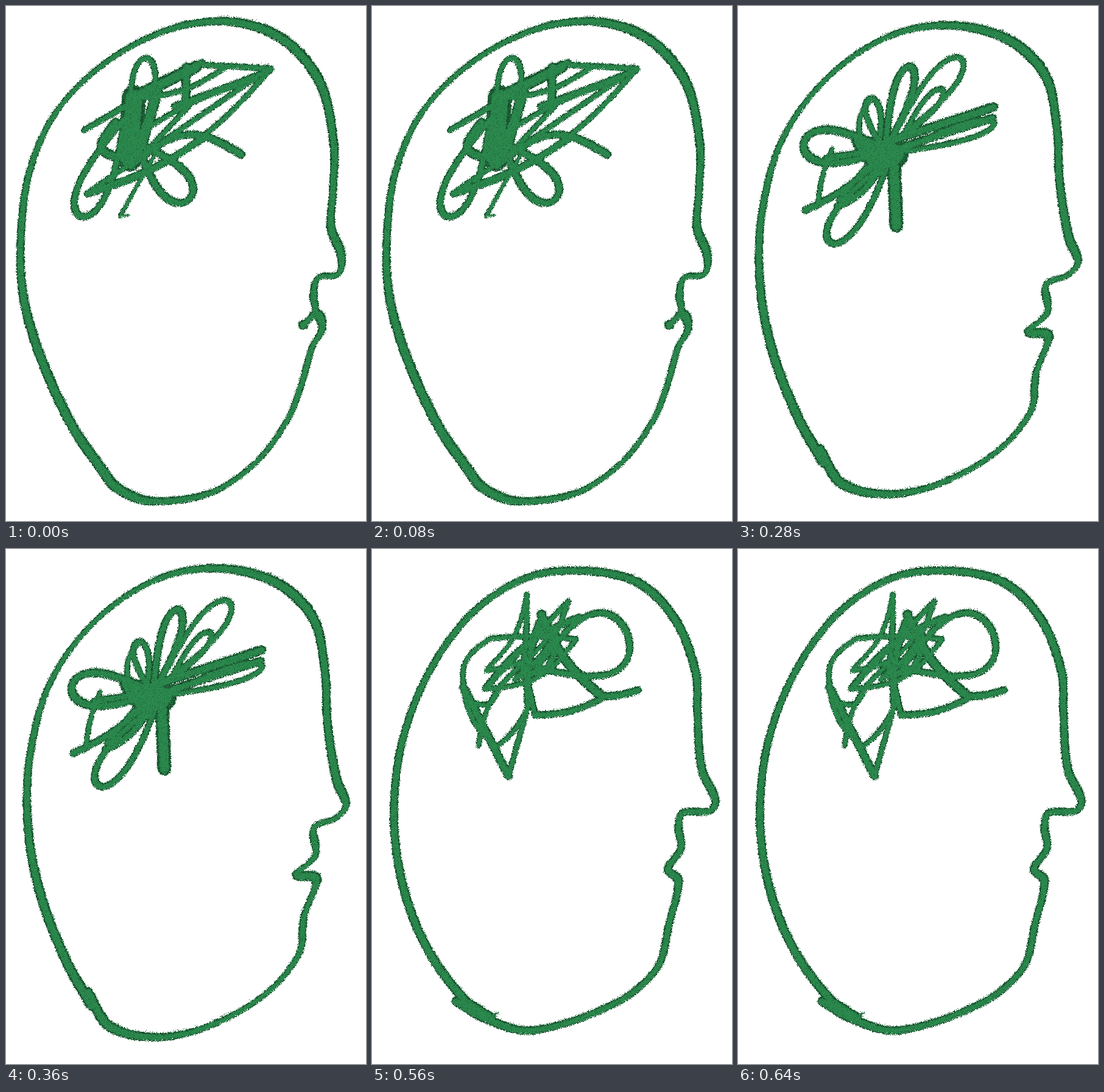
Animation of 591x846 px, one loop 700 ms. Source, as an HTML page with a canvas:

```html
<!DOCTYPE html>
<html lang="en">
<head>
<meta charset="utf-8">
<title>Scribbled thoughts</title>
<style>
  html, body { margin: 0; width: 100%; height: 100%; overflow: hidden; background: #fff; }
  canvas { position: absolute; left: 0; top: 0; animation: show 700ms step-end infinite; }
  @keyframes show {
    0% { opacity: 1; }
    20%, 100% { opacity: 0; }
  }
</style>
</head>
<body>
<script>
const W = 591, H = 846, HOLD = 140, LOOP = 700;
const PEN = 10, KNOT_NIB = 0.1;

// Each stroke is a function of t in 0..1 with a width and a nib contrast.
let strokes = [];

// Runs from a to b: "along" leads there, "across" swings to the right of travel.
function swing(ax, ay, bx, by, along, across, width) {
  const dx = bx - ax, dy = by - ay, len = Math.hypot(dx, dy);
  const at = t => [
    ax + dx * along(t) - dy / len * across(t),
    ay + dy * along(t) + dx / len * across(t)
  ];
  strokes.push({ at, width, nib: KNOT_NIB, steps: Math.ceil(len * 2.5) });
}

// A bowed line.
const arc = (ax, ay, bx, by, bow = 0, width = PEN) =>
  swing(ax, ay, bx, by, t => t, t => bow * Math.sin(Math.PI * t), width);

// A loop from a root, round the tip and back.
const petal = (ax, ay, bx, by, fat, width = PEN) =>
  swing(ax, ay, bx, by, t => Math.sin(Math.PI * t), t => fat * Math.sin(2 * Math.PI * t), width);

// A smooth closed-looking contour through key points, spaced by chord length.
function contour(text, nib) {
  const p = text.split(' ').map(s => s.split(',').map(Number));
  const n = p.length - 1, pos = [0];
  for (let i = 1; i <= n; i++) {
    pos.push(pos[i - 1] + Math.hypot(p[i][0] - p[i - 1][0], p[i][1] - p[i - 1][1]));
  }
  const slope = (i, k) => {
    const a = Math.max(0, i - 1), b = Math.min(n, i + 1);
    return (p[b][k] - p[a][k]) / (pos[b] - pos[a]);
  };
  const at = t => {
    const d = t * pos[n];
    let i = 0;
    while (i < n - 1 && pos[i + 1] < d) i++;
    const h = pos[i + 1] - pos[i], u = (d - pos[i]) / h, v = 1 - u;
    return [0, 1].map(k =>
      v * v * (1 + 2 * u) * p[i][k] + u * u * (1 + 2 * v) * p[i + 1][k] +
      u * v * h * (v * slope(i, k) - u * slope(i + 1, k)));
  };
  strokes.push({ at, width: 13.5, nib, steps: Math.ceil(pos[n]) });
}

const tallHead = () => contour('162,768 110,692 60,585 30,485 24,390 38,275 82,175 165,92 270,38 370,26 455,55 515,125 538,225 537,300 534,365 550,408 546,440 512,447 505,475 507,502 488,524 511,506 519,530 503,560 484,625 462,680 410,750 335,800 235,813 180,790 158,762', 0.32);

const roundHead = () => {
  contour('196,770 150,738 90,655 50,550 36,435 50,315 95,200 165,105 255,47 350,36 440,57 500,120 532,205 534,260 541,360 564,413 555,430 510,434 503,455 507,492 486,526 503,545 488,615 468,688 400,746 262,791 185,771 138,743', 0.15);
  arc(188, 773, 207, 762, 0, 3);
};

const slimHead = () => contour('140,750 98,675 56,565 36,455 40,335 75,215 150,115 250,49 350,32 445,56 505,115 524,205 528,290 543,380 558,420 543,441 506,458 508,503 478,535 509,541 489,605 481,665 425,732 330,785 245,802 170,784 134,728', 0.32);

const longHead = () => contour('190,806 115,727 55,615 32,480 37,350 75,235 140,135 230,65 330,32 415,38 488,85 525,170 537,280 533,375 543,420 508,447 499,475 502,508 474,533 505,514 512,545 490,600 463,695 375,765 280,812 215,815 180,792', 0.32);

function leafKnot() {
  petal(210, 240, 231, 86, 19);
  petal(195, 185, 122, 345, 24, 12);
  petal(215, 225, 300, 318, 26, 13);
  arc(180, 190, 205, 250, 38, 15);
  arc(215, 255, 386, 244, -38, 13);
  arc(255, 225, 187, 346, 0, 7);
  arc(187, 346, 201, 344, 0, 4);
  arc(128, 204, 322, 92, 0, 11);
  arc(325, 97, 435, 103);
  arc(435, 103, 133, 308, -30);
  arc(133, 308, 410, 118);
  arc(412, 120, 210, 215, 10);
  arc(362, 100, 215, 152, -12);
  arc(435, 105, 275, 165);
  arc(133, 310, 325, 218, 10);
  arc(300, 165, 205, 265);
  arc(296, 100, 295, 165, 0, 14);
  arc(210, 150, 203, 252, 0, 40);
  arc(250, 140, 225, 225, 0, 16);
  arc(205, 152, 312, 100, 0, 22);
}

function spikeKnot() {
  petal(295, 215, 328, 90, 13);
  arc(250, 180, 235, 137);
  arc(235, 137, 385, 163, 3);
  petal(375, 162, 438, 162, 11);
  arc(385, 164, 130, 285, 24);
  petal(270, 207, 472, 197, 7);
  petal(290, 215, 400, 228, 9, 7);
  arc(300, 225, 345, 265, 0, 14);
  petal(340, 265, 459, 245, 21, 12);
  arc(345, 265, 185, 265, -17, 12);
  arc(190, 265, 338, 332, 20, 11);
  arc(340, 330, 285, 215, 14, 14);
  petal(245, 205, 168, 190, 12, 12);
  arc(140, 308, 255, 175, 0, 13);
  petal(235, 215, 126, 288, 15);
  arc(115, 350, 240, 322, 8);
  arc(240, 322, 272, 225, 8);
  arc(140, 344, 250, 195);
  arc(182, 200, 234, 365, 12, 13);
  arc(275, 225, 276, 352, 7, 5);
  arc(244, 235, 231, 323, 0, 7);
  arc(230, 207, 302, 215, 0, 34);
  arc(225, 220, 285, 235, 18, 14);
}

function starKnot() {
  petal(242, 235, 283, 100, 15, 13);
  petal(250, 225, 366, 87, 21);
  petal(270, 215, 335, 138, 11);
  petal(262, 240, 420, 192, 13);
  petal(245, 237, 108, 228, 27, 14);
  petal(232, 225, 217, 152, 12);
  petal(250, 250, 151, 388, 22, 12);
  arc(255, 220, 420, 166, 0, 16);
  arc(260, 235, 418, 184, 0, 14);
  arc(240, 235, 145, 250, 0, 12);
  arc(200, 215, 217, 155, -8, 9);
  arc(155, 235, 131, 325, 4, 9);
  arc(110, 336, 240, 240, 10, 13);
  arc(163, 330, 235, 260, 10, 14);
  arc(165, 320, 210, 265);
  arc(260, 361, 255, 240, 0, 22);
  arc(232, 237, 255, 243, 0, 48);
  arc(200, 222, 232, 270, 0, 25);
}

function burstKnot() {
  petal(275, 185, 328, 74, 14, 9);
  petal(290, 170, 205, 122, 22, 13);
  arc(230, 120, 325, 160, -6, 13);
  petal(215, 225, 148, 138, 20, 13);
  petal(200, 235, 113, 233, 8, 12);
  petal(280, 205, 362, 120, 15, 13);
  petal(310, 195, 408, 127, 14, 12);
  petal(270, 230, 403, 200, 16, 12);
  petal(255, 255, 343, 250, 26, 13);
  petal(230, 220, 99, 354, 20);
  arc(424, 131, 330, 198, 0, 14);
  arc(408, 182, 250, 215, 8, 18);
  arc(250, 215, 405, 165, 4, 14);
  arc(277, 332, 250, 240, 0, 20);
  arc(140, 359, 235, 265, 10, 12);
  arc(182, 342, 220, 270, 4, 7);
  arc(180, 342, 194, 342, 0, 4);
  arc(145, 275, 250, 160);
  arc(200, 245, 163, 340);
  arc(208, 228, 245, 218, 0, 64);
  arc(245, 182, 246, 286, -6, 38);
  arc(175, 245, 280, 200, 0, 30);
}

function looseKnot() {
  arc(254, 75, 188, 198, -14, 8);
  arc(254, 75, 246, 210, -3);
  arc(188, 200, 300, 130, 18, 9);
  arc(322, 86, 185, 230);
  arc(322, 86, 235, 215, -14);
  petal(270, 195, 419, 140, 51, 12);
  arc(188, 228, 340, 112, -16, 13);
  arc(158, 250, 195, 147, -26, 9);
  arc(195, 147, 335, 148, -4, 9);
  arc(335, 148, 188, 230, -24, 9);
  arc(158, 250, 210, 225, 18, 9);
  arc(278, 108, 375, 240, 12, 15);
  arc(375, 242, 437, 232, 3, 13);
  arc(280, 108, 257, 255, 10, 14);
  arc(257, 255, 224, 373);
  arc(224, 373, 150, 227, 0, 13);
  arc(250, 195, 268, 273);
  arc(268, 273, 380, 244, 8, 12);
  arc(150, 228, 205, 325, 12, 9);
  arc(205, 325, 260, 250, 7, 9);
  arc(175, 323, 245, 190, -16, 9);
  arc(240, 208, 285, 200, 0, 13);
  arc(285, 200, 290, 130, 12, 13);
}

// The slanted nib is broad on falling diagonals and thin on rising ones.
function brush(ctx, { at, width, nib, steps }, color, scale, drop) {
  ctx.fillStyle = color;
  for (let i = 0; i <= steps; i++) {
    const t = i / steps;
    const [x, y] = at(t);
    const [x0, y0] = at(Math.max(0, t - 0.01));
    const [x1, y1] = at(Math.min(1, t + 0.01));
    const slant = Math.sin(2 * Math.atan2(y1 - y0, x1 - x0));
    ctx.beginPath();
    ctx.arc(x, y + drop, width / 2 * (1 + nib * slant) * scale, 0, 7);
    ctx.fill();
  }
}

function random(seed) {
  return () => {
    seed = seed + 0x6D2B79F5 | 0;
    let t = Math.imul(seed ^ seed >>> 15, 1 | seed);
    t = t + Math.imul(t ^ t >>> 7, 61 | t) ^ t;
    return ((t ^ t >>> 14) >>> 0) / 4294967296;
  };
}

// Scatter the paint into a grainy edge, driest on top.
function roughen(ctx) {
  const rnd = random(7);
  const paint = ctx.getImageData(0, 0, W, H).data;
  const out = ctx.createImageData(W, H);
  const jitter = () => (rnd() + rnd() - 1) * 1.5;
  for (let y = 5; y < H - 5; y++) {
    for (let x = 5; x < W - 5; x++) {
      const dry = rnd() < 0.2 ? rnd() * 3 : 0;
      const from = (Math.round(y + jitter() + dry) * W + Math.round(x + jitter())) * 4;
      if (paint[from + 3] < 128) continue;
      const edge = paint[from + 1] < 112;
      const shade = edge ? 0.4 + rnd() * 0.5 : rnd() < 0.12 ? 0.75 : 0.96 + rnd() * 0.06;
      const to = (y * W + x) * 4;
      [43, 138, 78].forEach((c, k) => { out.data[to + k] = c * shade; });
      out.data[to + 3] = 255;
    }
  }
  ctx.putImageData(out, 0, 0);
}

const scenes = [
  [tallHead, leafKnot], [roundHead, spikeKnot], [slimHead, starKnot],
  [longHead, burstKnot], [roundHead, looseKnot]
];

scenes.forEach(([head, knot], i) => {
  const canvas = document.createElement('canvas');
  canvas.width = W;
  canvas.height = H;
  const ctx = canvas.getContext('2d', { willReadFrequently: true });
  strokes = [];
  head();
  knot();
  strokes.forEach(s => brush(ctx, s, '#14542d', 1, 0));
  strokes.forEach(s => brush(ctx, s, '#2b8a4e', 0.66, 0.6));
  roughen(ctx);
  canvas.style.animationDelay = i * HOLD - LOOP + 'ms';
  document.body.append(canvas);
});
</script>
</body>
</html>
```
